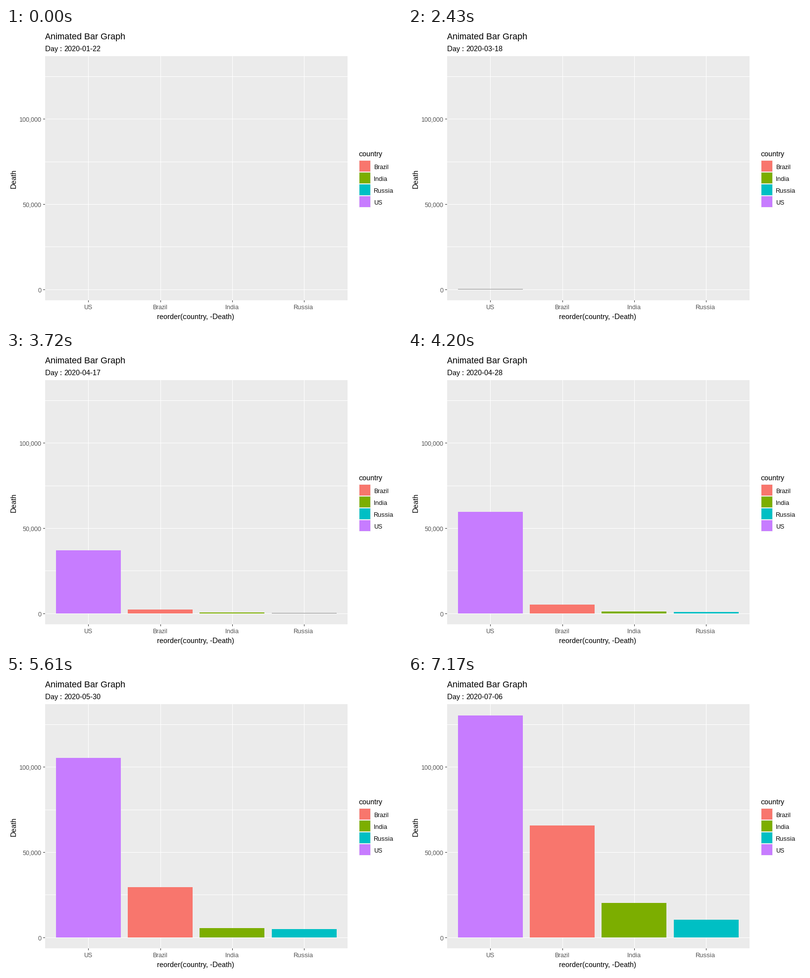
A matplotlib script that plays this animation: 800 by 600 pixels, repeating every 9000 ms.

```python
import numpy as np
import matplotlib.pyplot as plt
from matplotlib.animation import FuncAnimation
from matplotlib.patches import Rectangle

plt.rcParams.update({
    "font.family": "Liberation Sans",
    "text.hinting": "default",
    "text.hinting_factor": 1,
    "toolbar": "None",
})

FRAMES, LAST, STEP_MS = 300, 239, 30
DAYS = 166
START = np.datetime64("2020-01-22")

ZERO_Y = 529.55
PX_PER_DEATH = 450 / 130300
BAR_BOTTOM = 530

COLORS = {"US": "#C77CFF", "Brazil": "#F8766D",
          "India": "#7CAE00", "Russia": "#00BFC4"}
SLIVER = "#878787"

# Key days of each growth curve; deaths are joined smoothly on a log scale
KEY_DAYS = np.array([45, 60, 76, 87, 97, 113, 130, 151, 166])
DEATHS = {
    "US": [15.5, 550, 16950, 38800, 59100, 85800, 105350, 120750, 130300],
    "Brazil": [0.5, 25, 690, 2250, 4990, 13900, 29500, 50600, 65600],
    "India": [0.5, 8, 160, 540, 1000, 2640, 5370, 13800, 20150],
    "Russia": [0.05, 0.8, 58, 320, 860, 2290, 4670, 8100, 10270],
}


def growth(deaths, t):
    """Cubic Hermite curve through the log of the key values at day t."""
    if t < KEY_DAYS[0]:
        return 0.0
    v = np.log(deaths)
    slope = np.gradient(v, KEY_DAYS)
    k = min(np.searchsorted(KEY_DAYS, t, side="right"), len(v) - 1) - 1
    span = KEY_DAYS[k + 1] - KEY_DAYS[k]
    u = (t - KEY_DAYS[k]) / span
    blend = u * u * (3 - 2 * u)
    bend = slope[k] * u * (1 - u) ** 2 - slope[k + 1] * u * u * (1 - u)
    return np.exp(v[k] + (v[k + 1] - v[k]) * blend + span * bend)


def to_y(deaths):
    return round(ZERO_Y - deaths * PX_PER_DEATH)


fig = plt.figure(figsize=(8, 6), dpi=100, facecolor="white")
ax = fig.add_axes([0, 0, 1, 1])
ax.set_xlim(0, 800)
ax.set_ylim(600, 0)
ax.axis("off")


def box(x0, y0, x1, y1, color):
    patch = Rectangle((x0, y0), x1 - x0, y1 - y0, facecolor=color,
                      edgecolor="none", linewidth=0, antialiased=False)
    return ax.add_patch(patch)


def label(x, y, text, px, color="black", **kw):
    return ax.text(x, y, text, fontsize=px * 0.72, color=color,
                   va="baseline", **kw)


# Panel, grid and axes
box(79, 57, 690, 552, "#EBEBEB")
for deaths in range(0, 125001, 25000):
    y = to_y(deaths)
    box(79, y, 690, y + 1, "white")
    if deaths % 50000 == 0:
        box(75, y, 79, y + 1, "#333333")
        label(72, y + 6, f"{deaths:,}", 12, "#4D4D4D", ha="right")

centers = {c: 166.2 + 145.3 * n for n, c in enumerate(DEATHS)}
for country, cx in centers.items():
    x = round(cx)
    box(x, 57, x + 1, 552, "white")
    box(x, 552, x + 1, 556, "#333333")
    label(cx - 0.7, 570, country, 12, "#4D4D4D", ha="center")

bars = {c: box(round(cx - 65.4), BAR_BOTTOM, round(cx + 65.4), BAR_BOTTOM,
               COLORS[c])
        for c, cx in centers.items()}

# Titles
label(79, 23, "Animated Bar Graph", 18)
label(79, 47, "Day :", 15)
date = label(117, 47, "", 15)
label(383.4, 590, "reorder(country, -Death)", 15, ha="center")
label(20, 325, "Death", 15, rotation=90, rotation_mode="anchor")

# Legend
label(712, 260, "country", 15)
box(713, 268, 737, 364, "#F2F2F2")
for n, country in enumerate(sorted(COLORS)):
    y = 269 + 24 * n
    box(714, y, 736, y + 22, COLORS[country])
    label(743, y + 17, country, 12)


def draw(i):
    i = min(i, LAST)
    date.set_text(str(START + i * DAYS // LAST))
    for country, bar in bars.items():
        top = to_y(growth(DEATHS[country], i * DAYS / LAST))
        height = BAR_BOTTOM - top
        bar.set_y(top)
        bar.set_height(height)
        bar.set_visible(height > 0)
        # A one-pixel bar reads as a grey line
        bar.set_facecolor(SLIVER if height == 1 else COLORS[country])
    return [date, *bars.values()]


anim = FuncAnimation(fig, draw, frames=FRAMES, interval=STEP_MS,
                     init_func=lambda: draw(0), repeat=True, repeat_delay=0,
                     blit=False)
plt.show()
```
